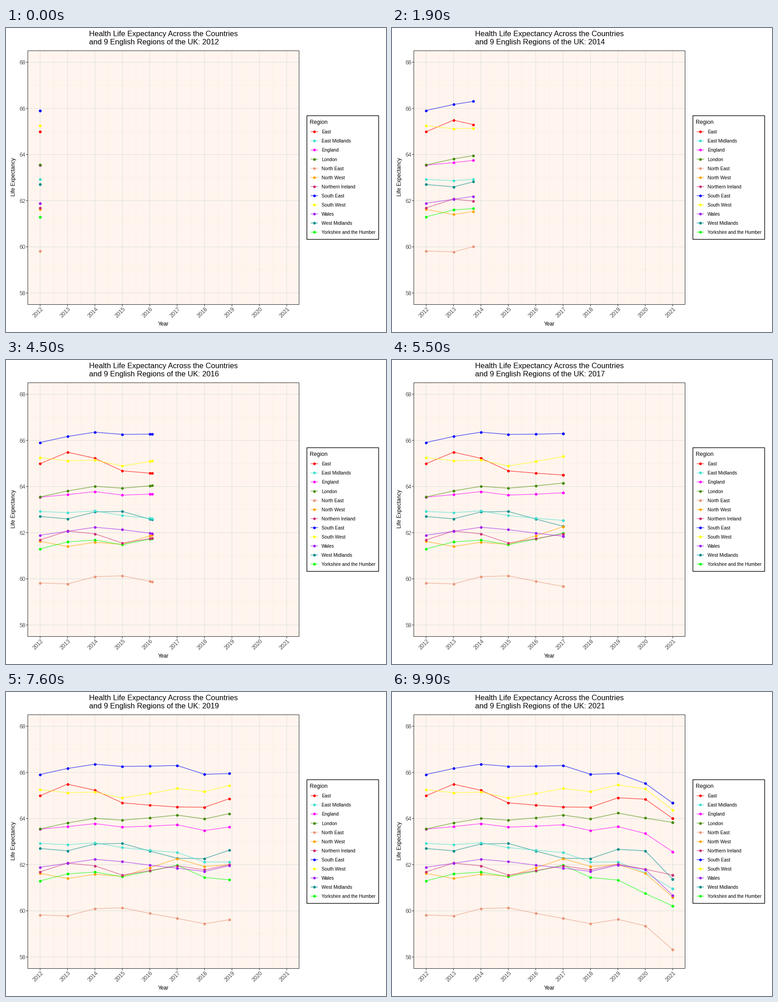
Write a matplotlib script that moves like this. It is 837 px wide and 669 px high and loops after 10000 ms.

```python
import numpy as np
import matplotlib.pyplot as plt
from matplotlib.animation import FuncAnimation
from matplotlib.patches import Rectangle

W, H, DPI = 837, 669, 72          # 72 dpi: one point is one pixel
STEPS, YEARS = 11, 10             # steps per year, years shown
FRAMES = STEPS * (YEARS - 1) + 1
LEFT, TOP, RIGHT, BOTTOM = 48, 50, 645.5, 608.5
INK, GRID, FAINT = "#333333", "#E0E0DE", "#FAF0E8"
plt.rcParams["font.family"] = "Liberation Sans"

# Every region follows the national trend plus a gap that drifts between knots.
TREND = [63.54, 63.65, 63.78, 63.63, 63.67, 63.73, 63.48, 63.65, 63.35, 62.56]
KNOTS = [0, 1, 3, 5, 8, 9]
REGIONS = {  # back to front
    "England": ("#FF00FF", [0] * len(KNOTS)),
    "West Midlands": ("#008B8B", [-.84, -1.05, -.71, -1.45, -.75, -1.19]),
    "East Midlands": ("#40E0D0", [-.62, -.78, -.89, -1.2, -1.7, -1.61]),
    "North East": ("#E9967A", [-3.72, -3.87, -3.5, -4.06, -4, -4.24]),
    "North West": ("#FFA500", [-1.92, -2.25, -2.14, -1.47, -1.73, -1.97]),
    "Yorkshire and the Humber": ("#00FF00", [-2.24, -2.05, -2.15, -1.75, -2.6, -2.35]),
    "East": ("#FF0000", [1.45, 1.84, 1.05, .77, 1.49, 1.44]),
    "London": ("#458B00", [.01, .16, .3, .42, .67, 1.27]),
    "South East": ("#0000FF", [2.37, 2.52, 2.63, 2.57, 2.17, 2.11]),
    "South West": ("#FFFF00", [1.71, 1.47, 1.26, 1.57, 1.93, 1.81]),
    "Northern Ireland": ("#CD3278", [-1.85, -1.58, -2.08, -1.78, -1.55, -1.01]),
    "Wales": ("#A020F0", [-1.65, -1.59, -1.5, -1.88, -1.56, -1.89]),
}


def px(year):
    """Stage x of a year counted from 2012."""
    return LEFT + (np.asarray(year) + 0.45) * (RIGHT - LEFT) / 9.9


def py(value):
    return TOP + (68.5 - np.asarray(value)) * (BOTTOM - TOP) / 11


def yearly(gaps):
    return TREND + np.interp(range(YEARS), KNOTS, gaps)


fig = plt.figure(figsize=(W / DPI, H / DPI), dpi=DPI, facecolor="white")
ax = fig.add_axes([0, 0, 1, 1])
ax.set(xlim=(0, W), ylim=(H, 0))
ax.axis("off")


def rule(x0, y0, x1, y1, color, z=1):
    ax.plot([x0, x1], [y0, y1], color=color, lw=1.1, zorder=z,
            solid_capstyle="butt", snap=False)


def box(x, y, w, h, z, **kw):
    ax.add_patch(Rectangle((x, y), w, h, zorder=z, snap=False, **kw))


def text(x, y, s, size, color="black", **kw):
    return ax.text(x, y, s, fontsize=size, color=color, **kw)


def trace(color):
    return ax.plot([], [], color=color, lw=1.6, alpha=0.6, zorder=4,
                   solid_capstyle="butt", snap=False)[0]


def dots(color):
    return ax.plot([], [], "o", color=color, ms=5.9, mew=0, zorder=5,
                   snap=False)[0]


def draw_panel():
    size = RIGHT - LEFT, BOTTOM - TOP
    box(LEFT, TOP, *size, 0, fc="#FFF5EE", ec="none")
    box(LEFT, TOP, *size, 6, fc="none", ec=INK, lw=1.1)
    for i in range(YEARS):
        x = px(i)
        if i < YEARS - 1:
            rule(px(i + 0.5), TOP, px(i + 0.5), BOTTOM, FAINT)
        rule(x, TOP, x, BOTTOM, GRID, 2)
        rule(x, BOTTOM, x, BOTTOM + 4, INK, 2)
        text(x - 4.6, 626.5, str(2012 + i), 12, "#4D4D4D", rotation=45,
             ha="center", va="center")
    for v in range(58, 69, 2):
        y = py(v)
        if v < 68:
            rule(LEFT, py(v + 1), RIGHT, py(v + 1), FAINT)
        rule(LEFT, y, RIGHT, y, GRID, 2)
        rule(LEFT - 4, y, LEFT, y, INK, 2)
        text(42.8, y + 4.8, str(v), 12, "#4D4D4D", ha="right")
    text(347, 655, "Year", 11.7, ha="center")
    text(17.3, 327.5, "Life Expectancy", 12, rotation=90,
         ha="center", va="center")


def draw_legend():
    box(662.7, 193, 158.1, 272.2, 1, fc="white", ec="black", lw=1.35)
    text(668.6, 211, "Region", 12.4)
    for i, name in enumerate(sorted(REGIONS)):
        color = REGIONS[name][0]
        y = 228.3 + 20.09 * i
        trace(color).set_data([671, 687.3], [y, y])
        dots(color).set_data([679], [y])
        text(694.8, y + 4, name, 10.25)


draw_panel()
draw_legend()
text(183.3, 18, "Health Life Expectancy Across the Countries", 16.5)
title = text(183.3, 36, "", 16.5)
series = [(trace(c), dots(c), yearly(gaps)) for c, gaps in REGIONS.values()]


def update(k):
    now = k / STEPS
    years = np.append(np.arange(k // STEPS + 1), now)
    for line, marks, values in series:
        xy = px(years), py(np.interp(years, range(YEARS), values))
        line.set_data(*xy)
        marks.set_data(*xy)
    title.set_text(f"and 9 English Regions of the UK: {2012 + round(now)}")
    return []


anim = FuncAnimation(fig, update, frames=FRAMES, interval=100,
                     repeat=True, repeat_delay=0, blit=False)
plt.show()
```
